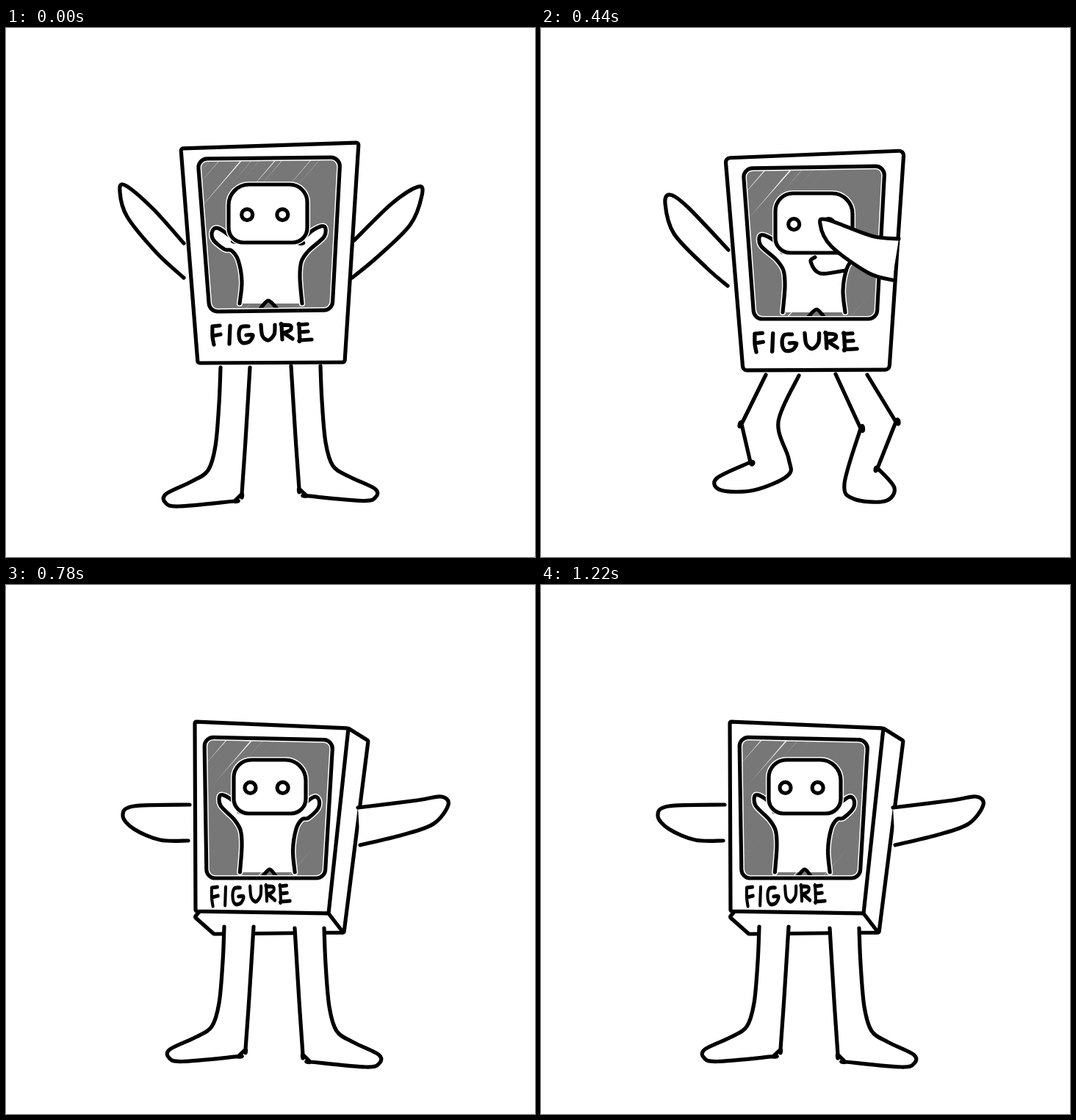
Animation of 720 by 720 pixels, one loop 1.33 s. Source, as an HTML page with a canvas:

```html
<!DOCTYPE html>
<html lang="en">
<head>
<meta charset="utf-8">
<title>Dancing box</title>
<style>
html, body { margin: 0; height: 100%; overflow: hidden; background: #fff; }
canvas { display: block; width: 100vw; height: 100vh; }
</style>
</head>
<body>
<canvas id="stage" width="720" height="720"></canvas>
<script>
const ctx = document.getElementById('stage').getContext('2d');
const LOOP = 1330, MIRROR = 730, LINE = 5.2, GREY = '#777';

// Points are written "x,y x,y"; strokes are separated by "|".
const points = s => s.trim().split(/\s+/).map(p => p.split(',').map(Number));

// Smooth open strokes through all points
function curve(s) {
  const path = new Path2D();
  for (const p of s.split('|').map(points)) {
    path.moveTo(...p[0]);
    for (let i = 0; i < p.length - 1; i++) {
      const a = p[i - 1] || p[i], b = p[i], c = p[i + 1], d = p[i + 2] || c;
      path.bezierCurveTo(b[0] + (c[0] - a[0]) / 6, b[1] + (c[1] - a[1]) / 6,
        c[0] - (d[0] - b[0]) / 6, c[1] - (d[1] - b[1]) / 6, ...c);
    }
  }
  return path;
}

// Closed polygon with rounded corners
function polygon(s, r) {
  const path = new Path2D(), p = points(s), last = p[p.length - 1];
  path.moveTo((last[0] + p[0][0]) / 2, (last[1] + p[0][1]) / 2);
  p.forEach((q, i) => path.arcTo(...q, ...p[(i + 1) % p.length], r));
  path.closePath();
  return path;
}

function place(path, ...matrix) {
  const moved = new Path2D();
  moved.addPath(path, new DOMMatrix(matrix));
  return moved;
}

function join(...paths) {
  const all = new Path2D();
  paths.forEach(p => all.addPath(p));
  return all;
}

const leg = curve('297,461 295,510 290,568 280,601 258,616 223,633 222,645 240,650 316,643 316,643 326,633 326,633 331,560 337,461');
const standing = join(leg, place(leg, -1, 0, 0, .97, MIRROR, 12));

const body = curve(`318,375 321,345 316,316 307,303 297,301 282,288 281,276 290,273 314,290 314,290 399,292 399,292
  418,275 433,270 433,284 412,303 402,318 400,340 403,375`);
const crotch = curve('347,381 357,371 368,381');

const letters = curve(`0,2 0,16 2,27|0,2 10,1|1,15 11,13|24,1 23,26|49,2 39,3 36,14 40,24 50,23 55,14 46,14
  |66,0 68,15 76,21 84,13 85,0|95,20 94,0 94,0 106,1 106,7 97,11 97,11 109,19|129,-1 118,0 118,0 119,21 119,21 135,20|119,10 130,9`);

// head: x, y, width, height; gaze: place of the first eye across the head; body: scale x, shift x, shift y
const front = {
  back: curve(`242,293 200,246 162,214 155,223 165,257 205,306 242,340
    |474,289 525,239 561,216 566,228 550,268 505,312 471,340`),
  box: polygon('238,164 480,156 461,455 261,456', 3),
  pane: polygon('261,178 455,176 444,384 277,386', 12),
  head: [303, 213, 107, 79], gaze: .235, body: [1, 0, 0],
  legs: place(standing, 1, 0, 0, 1, -5, 1)
};

const turned = {
  back: curve('480,293 556,295 571,308 556,326 520,341 482,342'),
  side: join(polygon('264,189 237,206 270,467 447,469 473,446', 2), curve('291,441 271,467')),
  box: polygon('264,189 473,180 472,438 291,441', 2),
  pane: polygon('285,205 460,201 457,393 296,393', 12),
  head: [322, 232, 98, 73], gaze: .32, body: [.88, 57, 10],
  front: curve('251,297 170,287 138,282 128,293 148,319 190,334 248,348'),
  legs: standing
};

const reach = {
  back: curve('238,280 185,245 158,234 149,245 170,295 190,316 228,335'),
  side: join(polygon('237,200 268,177 474,168 481,181 466,451 437,467', 2), curve('452,192 475,179')),
  box: polygon('237,200 452,192 437,467 257,468', 5),
  pane: polygon('249,215 438,210 421,407 262,413', 12),
  head: [284, 234, 103, 72], gaze: .27, body: [1.1, -38, 22],
  front: curve(`367,311 334,303 331,311 345,325 367,329
    |454,284 395,266 360,250 338,249 335,263 360,296 400,318 435,330`),
  legs: curve(`282,475 249,537 249,537 261,601 261,601 215,625 222,647 285,644 313,634
    |338,476 295,542 295,542 321,601|383,470 418,548 449,621
    |440,470 475,547 511,618 511,618 533,618 541,633|452,635 468,653 510,655 541,643`)
};

const cross = {
  back: curve('475,308 530,250 554,233 561,245 549,286 505,332 476,357'),
  box: polygon('236,173 479,183 455,472 256,471', 6),
  pane: polygon('262,194 455,197 440,402 273,402', 12),
  head: [306, 231, 105, 81], gaze: .31, body: [1, -2, 18],
  front: curve(`357,318 363,324 350,340 316,336
    |243,293 280,289 340,267 350,273 335,303 285,339 252,349`),
  legs: curve(`286,478 247,542 247,542 272,605 272,605 249,632 262,650 304,647 317,626 295,551 295,551 329,477
    |379,479 407,542 393,592 394,615 440,635 485,635 491,619 445,597 445,597 457,545 457,545 424,478`)
};

// text: x, y, width scale, slope; lean: direction of the shading
const scenes = {
  front: { pose: front, text: [281, 404, 1, 0] },
  left: { pose: turned, text: [310, 407, .92, 0] },
  right: { pose: turned, flip: true, dy: 6, text: [280, 410, .79, 0] },
  reachRight: { pose: reach, text: [277, 429, .99, -.08] },
  reachLeft: { pose: reach, flip: true, dy: 6, text: [321, 425, .99, .08] },
  crossLeft: { pose: cross, lean: -1, text: [275, 421, 1.03, -.02] },
  crossRight: { pose: cross, flip: true, dy: -6, text: [291, 414, 1.03, .02] }
};
const order = ['front', 'left', 'crossRight', 'reachRight', 'crossRight', 'left',
  'front', 'right', 'crossLeft', 'reachLeft', 'crossLeft', 'right'];

function outline(path, width = LINE, color = '#000') {
  ctx.lineWidth = width;
  ctx.strokeStyle = color;
  ctx.stroke(path);
}

function ink(path, fill = '#fff', halo = 0) {
  if (!path) return;
  ctx.fillStyle = fill;
  ctx.fill(path);
  if (halo) outline(path, LINE + halo, '#fff');
  outline(path);
}

// Marker scribble: slanted strokes of uneven width leave thin gaps
function scribble(pane, lean) {
  let seed = 4242;
  const rnd = () => (seed = seed * 16807 % 2147483647) / 2147483647;
  ctx.save();
  ctx.clip(pane);
  for (let x = 0; x < 720; x += 5) {
    const stroke = new Path2D(), tilt = (rnd() - .5) * 8;
    stroke.moveTo(x - lean * 130 - tilt, 450);
    stroke.lineTo(x + lean * 130 + tilt, 150);
    outline(stroke, 4.8 + rnd() * 2.4, GREY);
  }
  ctx.restore();
}

function drawDoll({ head: [x, y, w, h], gaze, body: [scale, dx, dy] }) {
  ink(place(body, scale, 0, 0, 1, dx, dy), '#fff', 3);
  ink(place(crotch, scale, 0, 0, 1, dx, dy), GREY);
  const face = new Path2D();
  face.roundRect(x, y, w, h, [28, 24, 20, 20]);
  ink(face, '#fff', 3);
  for (const side of [gaze, gaze + .45]) {
    const eye = new Path2D();
    eye.arc(x + w * side, y + h * .52, 7.5, 0, 7);
    outline(eye);
  }
}

function draw({ pose, flip, dy = 0, text: [x, y, scale, slope], lean = 1 }) {
  const dir = flip ? -1 : 1;
  ctx.resetTransform();
  ctx.fillStyle = '#fff';
  ctx.fillRect(0, 0, 720, 720);
  ctx.lineCap = ctx.lineJoin = 'round';

  ctx.setTransform(dir, 0, 0, 1, flip ? MIRROR : 0, dy);
  ink(pose.back);
  ink(pose.side);
  ink(pose.legs);
  ink(pose.box);
  scribble(pose.pane, lean * dir);
  drawDoll(pose);
  outline(pose.pane, LINE + 3, '#fff');
  outline(pose.pane);
  ink(pose.front);

  ctx.setTransform(scale, slope, 0, 1, x, y);
  outline(letters);
}

function tick() {
  const t = performance.now() % LOOP;
  // Steps of 110 ms; the fifth and the last stay 10 ms longer or start later
  const step = Math.floor((t < 560 ? Math.min(t, 549) : t - 10) / 110);
  draw(scenes[order[step]]);
  requestAnimationFrame(tick);
}
tick();
</script>
</body>
</html>
```
